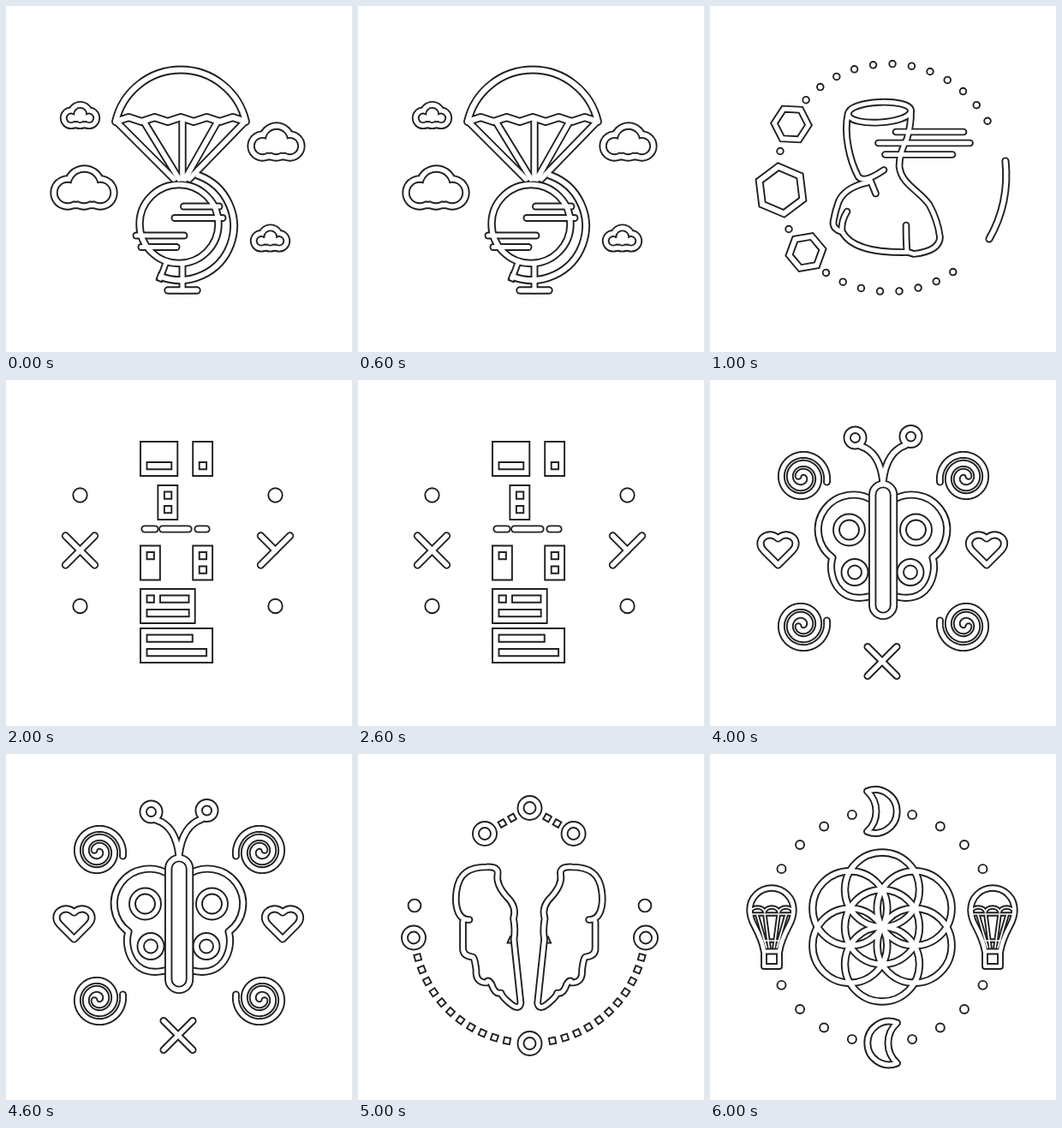
These frames come from a looping animation (404 by 404 pixels, 7000 ms). An HTML page:

```html
<!DOCTYPE html>
<html lang="en">
<head>
<meta charset="utf-8">
<title>Line icons</title>
<style>
html, body { margin: 0; width: 100%; height: 100%; overflow: hidden; background: #fff; }
svg { display: block; width: 100vw; height: 100vh; }
</style>
</head>
<body>
<svg id="stage" viewBox="0 0 404 404" fill="none"></svg>
<script>
const INK = '#231f20', LINE = 1.9;

const times = (n, f) => Array.from({ length: n }, (_, i) => f(i));
const polar = (x, y, r, deg) => {
  const a = deg * Math.PI / 180;
  return [+(x + r * Math.cos(a)).toFixed(2), +(y + r * Math.sin(a)).toFixed(2)];
};
const poly = pts => 'M' + pts.map(p => p.join(' ')).join('L');
const ring = (x, y, r) =>
  `M${x - r} ${y}a${r} ${r} 0 1 0 ${2 * r} 0a${r} ${r} 0 1 0 ${-2 * r} 0Z`;
const seg = (d, w = 7.5, flat = false) => ({ d, w, flat });

// Hollow bands: ink strokes first, then narrower white ones, so overlaps merge.
function union(...parts) {
  const layer = (color, grow) => parts.map(({ d, w, flat }) =>
    `<path d="${d}" stroke="${color}" stroke-width="${w + grow}" stroke-linecap="${flat ? 'square' : 'round'}" stroke-linejoin="${flat ? 'miter' : 'round'}"/>`).join('');
  return layer(INK, LINE) + layer('#fff', -LINE);
}
const tubes = (w, ...ds) => union(...ds.map(d => seg(d, w)));
const outline = (d, fill = 'none') =>
  `<path d="${d}" fill="${fill}" stroke="${INK}" stroke-width="${LINE}"/>`;
const dot = (x, y, ...radii) => radii.map(r => outline(ring(x, y, r))).join('');
const box = (x, y, w, h) => outline(`M${x} ${y}h${w}v${h}h${-w}Z`);
const place = (x, y, s, sx = 1, sy = 1) =>
  `<g transform="translate(${x} ${y}) scale(${sx} ${sy})">${s}</g>`;
const mirror = (s, ax) => s + place(2 * ax, 0, s, -1);
const flip = (s, ay) => s + place(0, 2 * ay, s, 1, -1);
const turn = (s, a, x, y) => `<g transform="rotate(${a} ${x} ${y})">${s}</g>`;
const arcDots = (n, x, y, r, from, step, size) =>
  times(n, i => dot(...polar(x, y, r, from + i * step), size)).join('');

function cloud(x, y, k, band = 7.5) {
  const puffs = [[.5, -2, 20], [0, 6, 16], ...[-1, 1].flatMap(s => [[19 * s, 6, 16], [9.5 * s, 6, 14.5]])];
  const layer = (color, grow) => puffs.map(([px, py, r]) =>
    `<circle cx="${x + px * k}" cy="${y + py * k}" r="${r * k + grow}" fill="${color}"/>`).join('');
  const h = band / 2, l = LINE / 2;
  return layer(INK, h + l) + layer('#fff', h - l) + layer(INK, l - h) + layer('#fff', -h - l);
}

const hexagon = (x, y, deg, ...radii) => radii.map(r =>
  outline(poly(times(6, i => polar(x, y, r, deg + i * 60))) + 'Z')).join('');

function parachute() {
  const hem = times(11, i => [280 - i * 15.2, i % 2 ? 130 : 135]);
  const cords = [[129, 196], [161, 202], [206, 206], [247, 209], [279, 214]];
  return cloud(86.5, 127.5, .55, 7) + cloud(315.5, 158.5, .84) +
    cloud(91, 212, 1) + cloud(308.5, 271, .55, 7) +
    union(
      seg('M128 135A78 78 0 0 1 280 135' + poly(hem).replace('M', 'L'), 8),
      ...cords.map(([top, end]) => seg(`M${top} 135L${end} 202`)),
      seg(ring(202, 254.5, 46)),
      seg('M225 198A61.500 61.500 0 1 1 181 316', 8, true),
      seg('M186 302L180 318', 6.5, true),
      seg('M206 303V332', 7), seg('M189 332H223', 7.5),
      seg('M207.500 234H249', 7), seg('M197 247.500H253', 7),
      seg('M152 268H208', 7), seg('M158 281.500H199', 7));
}

function bust() {
  return arcDots(12, 209, 200, 132.5, -137, 9.75, 3.8) +
    arcDots(8, 209, 200, 133.5, 123.4, -9.64, 3.8) +
    dot(82, 169.5, 3.8) + dot(92, 260.5, 3.8) +
    hexagon(95, 138, 3, 24, 16) + hexagon(83, 215, -97, 32, 23) + hexagon(112, 287.5, -10, 24, 15.5) +
    tubes(7.3, 'M345 181Q350 230 326 272') +
    tubes(6.8,
      'M161.500 126C161 110 234 107 234.500 122C234 138 162 142 161.500 126Z',
      'M161 126C156 150 163 180 173 199Q179 208 203 191.500',
      'M187 203L193.500 219',
      'M184 206Q157 212 150 229Q146 240 144 252Q143 259 152 263',
      'M160 240Q153 251 154 263C165 285 200 288 230 287.500',
      'M234.500 122Q235 139 230 155Q221 172 221 187C223 208 244 215 256 232Q266 250 268.500 270Q268 286 238 289.500L230 287Q229 275 229 256',
      'M217 147H296', 'M196.500 160H303.500', 'M204.500 173.500H283');
}

// A card spans n columns and may hold a bar in its upper and lower row.
function card(col, y, n, upper, lower) {
  const x = 157 + col * 20.4;
  const bar = (size, dy) => size ? box(x + 7.5, y + dy, size * 20.4 - 12, 8.2) : '';
  return box(x, y, n * 20.4 + 2.5, 40) + bar(upper, 7.5) + bar(lower, 24);
}

function blocks() {
  return card(0, 72, 2, 0, 2) + card(3, 72, 1, 0, 1) + card(1, 123, 1, 1, 1) +
    card(0, 193.5, 1, 1, 0) + card(3, 193.5, 1, 1, 1) +
    card(0, 244, 3, 1, 3) + box(180, 251.5, 33.5, 8.2) + card(0, 290, 4, 3.2, 4) +
    ['M162 174H174', 'M182.700 174H213', 'M224 174H234'].map(d => tubes(7.3, d)).join('') +
    flip(mirror(dot(86.5, 134.5, 8.2), 200.5), 199.25) +
    tubes(7.5, 'M69.500 182L103.500 216', 'M103.500 182L69.500 216') +
    tubes(7.5, 'M297.500 182L314.500 199', 'M331.500 182L297.500 216');
}

function flagBearer() {
  const ray = outline('M145.500 110.500L158.500 108.500V119.500L145.500 117.500Z');
  return dot(118.5, 114, 21, 13.7) +
    times(7, i => turn(ray, 75 + i * 45, 118.5, 114)).join('') +
    cloud(81, 205.5, .77) +
    tubes(7.5, 'M148 254L101.500 322.500') +
    union(
      seg(ring(257, 82, 9)), seg('M253 91L224 138'),
      seg('M242 109Q275 136 310 153Q332 163 348.500 178Q318 205 306 239.500Q276 222 246 205'),
      seg('M276 134L248 180', 7), seg('M309 154Q287 183 276 213', 7)) +
    tubes(7,
      'M150 156Q166 155 169 143',
      'M145 158C142 126 154 118 178 118Q198 115 205 127Q207 137 217 136Q237 146 242 180Q255 180 266 180Q267 194 250 199Q241 196 234 185',
      'M203 180.500Q213 187 224 182Q236 192 255 187',
      'M221 187Q223 200 216.500 208',
      'M147 162Q174 160 187 186Q192 201 199 205Q207 210 197 221',
      'M203 209Q210 212 206 222Q211 230 219 227Q224 237 231 228Q243 229 240 217Q246 209 238 199',
      'M145 160Q134 172 140 189Q138 203 131 217Q134 224 143 221',
      'M138 222Q135 229 149 235Q139 236 141 243Q148 247 147 249Q158 258 183 246',
      'M173 252L180 285',
      'M177 272C145 286 130 305 138 317C150 335 220 335 252 307Q272 290 269 276Q264 265 245 268Q227 261 222 232') +
    outline('M145 196Q155 190 164 195Q168 198 161 203Q154 211 148 208Q154 205 156 201Q150 198 145 196Z');
}

function butterfly() {
  const wing = tubes(7.3, 'M192 142A39.500 39 0 1 0 143 207.500C137 226 148 266 192 251') +
    dot(162.5, 175, 18.5, 11.5) + dot(169, 224.5, 15.5, 8);
  const heart = tubes(7.3, 'M0 18L-17 1C-28 -11 -11 -24 0 -13C11 -24 28 -11 17 1Z');
  const coil = tubes(7, poly(times(149, i => polar(0, 0, 29.4 - i / 6, 10 - i * 6))));
  return mirror(wing, 201.5) +
    '<rect x="190" y="122" width="24" height="153" rx="12" fill="#fff"/>' +
    union(
      seg('M189.700 134a12.400 12.400 0 0 1 24.800 0V263a12.400 12.400 0 0 1 -24.800 0Z'),
      seg(ring(169.5, 67.5, 9.3)), seg(ring(234.5, 66, 9.3)),
      seg('M175.500 77Q198 84 202 118'), seg('M228.500 76Q206 84 202 118')) +
    mirror(place(79.5, 198, heart), 201.25) +
    flip(mirror(place(107.5, 114, coil), 202.5), 200) +
    tubes(7.2, 'M184 311.500L218 345.500', 'M218 311.500L184 345.500');
}

function wings() {
  const tile = (x, y, a) => turn(box(x - 3.6, y - 3.6, 7.2, 7.2), a, x, y);
  const chain = tile(168.5, 81, -30) + tile(180, 74.5, -30) + times(11, i => {
    const a = 164.8 - i * 6.35;
    return tile(...polar(200.5, 202, 135.5, a), a);
  }).join('');
  const wing = outline('M178 212.500L174.500 220.500H182', '#fff') + tubes(6.8,
    'M130 193.500C115 194 113 174 115 160C118 139 130 132 150 132Q165 131 163 141Q161 152 173 166Q186 178 181.500 192Q184 206 182 216L190 291Q188 301 175 289Q168 283 167 279Q160 281 156 269Q152 262 150 267Q137 267 138 252Q136 237 134 237Q122 236 122.500 226V196');
  return dot(200.5, 63, 14, 7) + dot(200.5, 338, 14, 7) +
    mirror(dot(148, 93, 14, 7), 199.8) +
    mirror(dot(65, 214.5, 14, 7) + dot(66, 177, 7.4) + chain, 200.5) +
    mirror(wing, 199.8);
}

function flower() {
  const R = 43.5;
  const petals = times(6, i => seg(ring(...polar(201, 202, R, 30 + i * 60), R)));
  const moon = tubes(7, 'M183.500 43.500A25.300 25.300 0 1 1 183.500 90.500A31.500 31.500 0 0 0 183.500 43.500Z');
  const cords = [[55, 66], [64, 69], [80, 75], [89, 78]];
  const balloon = union(
    seg('M47.200 185' + 'a8.300 6 0 0 1 16.600 0'.repeat(3), 3.6),
    seg('M49 187H95', 3.6), seg('M63 218H81', 3.6),
    ...cords.map(([top, end]) => seg(`M${top} 188L${end} 226`, 3.6)),
    seg('M63 230.500Q61 218 52 201Q46.500 191 46.500 182A25.500 25.500 0 0 1 97.500 182Q97.500 191 92 201Q83 218 81 230.500', 6.6),
    seg('M63 230.500H81V248H63Z', 6));
  return union(seg(ring(201, 202, R)), ...petals) +
    moon + place(402, 270.5, moon, -1) + mirror(balloon, 201) +
    flip(mirror(arcDots(4, 201, 202, 135.7, 210, 15, 5), 201), 202);
}

const scenes = [parachute, bust, blocks, flagBearer, butterfly, wings, flower];
const stage = document.getElementById('stage');
stage.innerHTML = scenes.map(draw => `<g>${draw()}</g>`).join('');
const groups = [...stage.children];

function show(ms) {
  const now = Math.floor(ms / 1000) % scenes.length;
  groups.forEach((g, i) => { g.style.display = i === now ? '' : 'none'; });
}

const start = performance.now();
function tick() {
  show(performance.now() - start);
  requestAnimationFrame(tick);
}
show(0);
requestAnimationFrame(tick);
</script>
</body>
</html>
```
